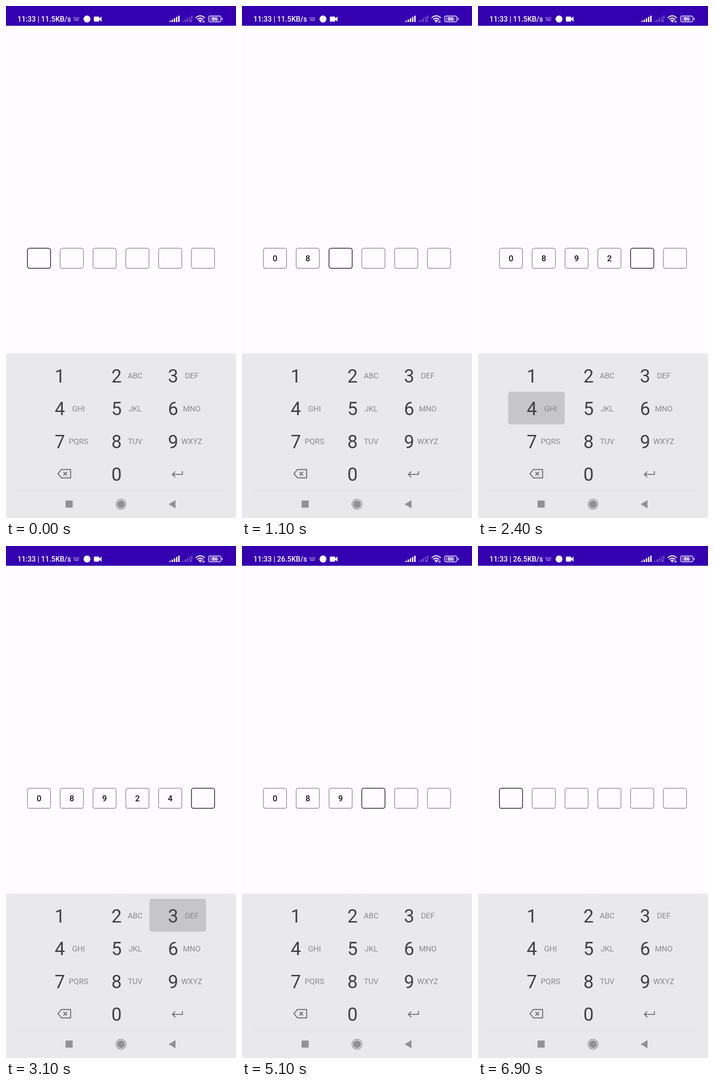
An HTML page for the animation above (7000 ms loop, 502 by 1115 pixels).

```html
<!DOCTYPE html>
<html lang="en">
<head>
<meta charset="utf-8">
<title>Code entry</title>
<style>
  html, body { margin: 0; width: 100%; height: 100%; overflow: hidden; background: #fefcff; }
  svg { display: block; width: 502px; height: 1115px; font-family: Roboto, sans-serif; }
  text { text-anchor: middle; }
  .status { font-size: 15.7px; font-weight: 500; fill: #fff; text-anchor: start; }
  .level { font-size: 10.5px; font-weight: 700; fill: #fff; }
  .digit { font-size: 40px; fill: #424143; }
  .letters { font-size: 16.9px; fill: #8a898b; }
  .code { font-size: 18px; font-weight: 500; fill: #19181b; }
  .box { fill: none; stroke: #8a898c; stroke-width: 1.4; }
  .box.active { stroke: #18171d; stroke-width: 1.5; }
  .icon { fill: none; stroke: #737274; stroke-width: 2.2; }
</style>
</head>
<body>
<svg viewBox="0 0 502 1115">
  <defs>
    <linearGradient id="edge" x2="0" y2="1">
      <stop offset="0" stop-color="#fefcff"/>
      <stop offset="1" stop-color="#e9e8ea"/>
    </linearGradient>
  </defs>
  <rect width="502" height="1115" fill="#fefcff"/>
  <rect width="502" height="43" fill="#3500b0"/>

  <text id="status" class="status" x="25" y="34"></text>
  <g fill="none" stroke="#cfc1ee" stroke-width="1.4">
    <path d="M147 25.2H160.5M147.5 28H160" stroke-dasharray="1.6 1"/>
    <path d="M149 31H158.5"/>
  </g>
  <circle cx="176.8" cy="28.3" r="7.6" fill="#fff"/>
  <path d="M193 23H202Q203.300 23 203.300 24.300V27L208.500 23V34L203.300 30V32.700Q203.300 34 202 34H193Q191.700 34 191.700 32.700V24.300Q191.700 23 193 23Z" fill="#fff"/>

  <g id="signal"></g>
  <path d="M399.500 28.500L406 35M406 28.500L399.500 35" stroke="#8a6ad2" stroke-width="1.5"/>

  <g fill="none" stroke="#fff" stroke-width="2.2">
    <path d="M414 25.800Q424 17 434 25.800"/>
    <path d="M417.300 29.300Q424 23.300 430.700 29.300"/>
    <path d="M420.300 32.300Q424 29 427.700 32.300"/>
  </g>
  <path d="M421.500 33.500Q424 31.500 426.500 33.500L424 36.300Z" fill="#fff"/>
  <path d="M429.700 36.500V31.500M432.300 31.500V36.500" stroke="#fff" stroke-width="1.3"/>

  <rect x="442" y="21.700" width="27" height="12.800" rx="3.500" fill="none" stroke="#fff" stroke-width="1.4"/>
  <rect x="444" y="23.700" width="20" height="8.800" rx="1.500" fill="#7653c9"/>
  <path d="M471.700 26V30.500" stroke="#fff" stroke-width="1.700"/>
  <text class="level" x="455.5" y="32">86</text>

  <g id="boxes"></g>

  <rect y="757" width="502" height="358" fill="#e9e8ea"/>
  <rect y="755" width="502" height="4" fill="url(#edge)"/>
  <rect id="press" width="123.500" height="71.300" rx="5" fill="#c6c5c7"/>
  <g id="keys"></g>
  <path class="icon" d="M113.500 1018.500L121 1009.300H141V1027.700H121ZM125.300 1014.500L133.300 1022.500M133.300 1014.500L125.300 1022.500"/>
  <path class="icon" d="M385 1013V1020H363.500M369.500 1013.700L363.200 1020L369.500 1026.300"/>

  <path d="M24 1054.500H478" stroke="#dddcde"/>
  <g fill="#929193">
    <rect x="130" y="1077" width="15.500" height="15.500"/>
    <circle cx="251" cy="1085" r="8.600"/>
    <circle cx="251" cy="1085" r="10.900" fill="none" stroke="#929193" stroke-width="1.500"/>
    <path d="M355 1085L370 1076V1094Z"/>
  </g>
</svg>
<script>
const LOOP = 7000, HOLD = 200, DEL = "<";
const $ = id => document.getElementById(id);

// [press time, key]: digits land on release, deletion on touch
const taps = [
  [300, "0"], [800, "8"], [1300, "9"], [1800, "2"], [2400, "4"], [3000, "3"],
  [4100, DEL], [4600, DEL], [4900, DEL], [5150, DEL], [5400, DEL], [5800, DEL]
];
const letters = ["", "ABC", "DEF", "GHI", "JKL", "MNO", "PQRS", "TUV", "WXYZ"];
const layout = "123456789" + DEL + "0";
const place = key => {
  const i = layout.indexOf(key);
  return [i % 3 * 123.6, Math.floor(i / 3) * 71.5];
};

$("keys").innerHTML = [..."1234567890"].map((key, i) => {
  const [x, y] = place(key);
  return `<text class="digit" x="${x + 117.6}" y="${y + 819.5}">${key}</text>` +
    `<text class="letters" x="${x + 158.3}" y="${y + 811}">${letters[i] || ""}</text>`;
}).join("");

const bars = (x, color) => [3, 5.5, 8.5, 11.5, 14].map((h, i) =>
  `<rect x="${x + i * 4.8}" y="${35 - h}" width="3" height="${h}" rx="1" fill="${color}"/>`).join("");
$("signal").innerHTML = bars(356.7, "#fff") +
  bars(384.7, "#7350c8") + '<rect x="398.500" y="27.500" width="9" height="8" fill="#3500b0"/>';

$("boxes").innerHTML = Array.from({ length: 6 }, (_, i) => {
  const x = 46.7 + i * 71.6;
  return `<rect class="box" x="${x}" y="527.500" width="50.600" height="43.700" rx="4.500"/>` +
    `<text class="code" x="${x + 25.3}" y="556"></text>`;
}).join("");
const boxes = document.querySelectorAll(".box");
const codes = document.querySelectorAll(".code");

function draw(t) {
  let code = "", held = null;
  for (const [at, key] of taps) {
    if (t >= at && t < at + HOLD) held = key;
    if (key === DEL) {
      if (t >= at) code = code.slice(0, -1);
    } else if (t >= at + HOLD) code += key;
  }
  boxes.forEach((box, i) => {
    box.classList.toggle("active", i === code.length);
    codes[i].textContent = code[i] || "";
  });
  const press = $("press");
  press.style.display = held ? "" : "none";
  if (held) {
    const [x, y] = place(held);
    press.setAttribute("x", x + 65.7);
    press.setAttribute("y", y + 768.5);
  }
  $("status").textContent = `11:33 | ${t < 3600 ? "11.5" : "26.5"}KB/s`;
}

const start = performance.now();
function tick() {
  draw((performance.now() - start) % LOOP);
  requestAnimationFrame(tick);
}
tick();
</script>
</body>
</html>
```
